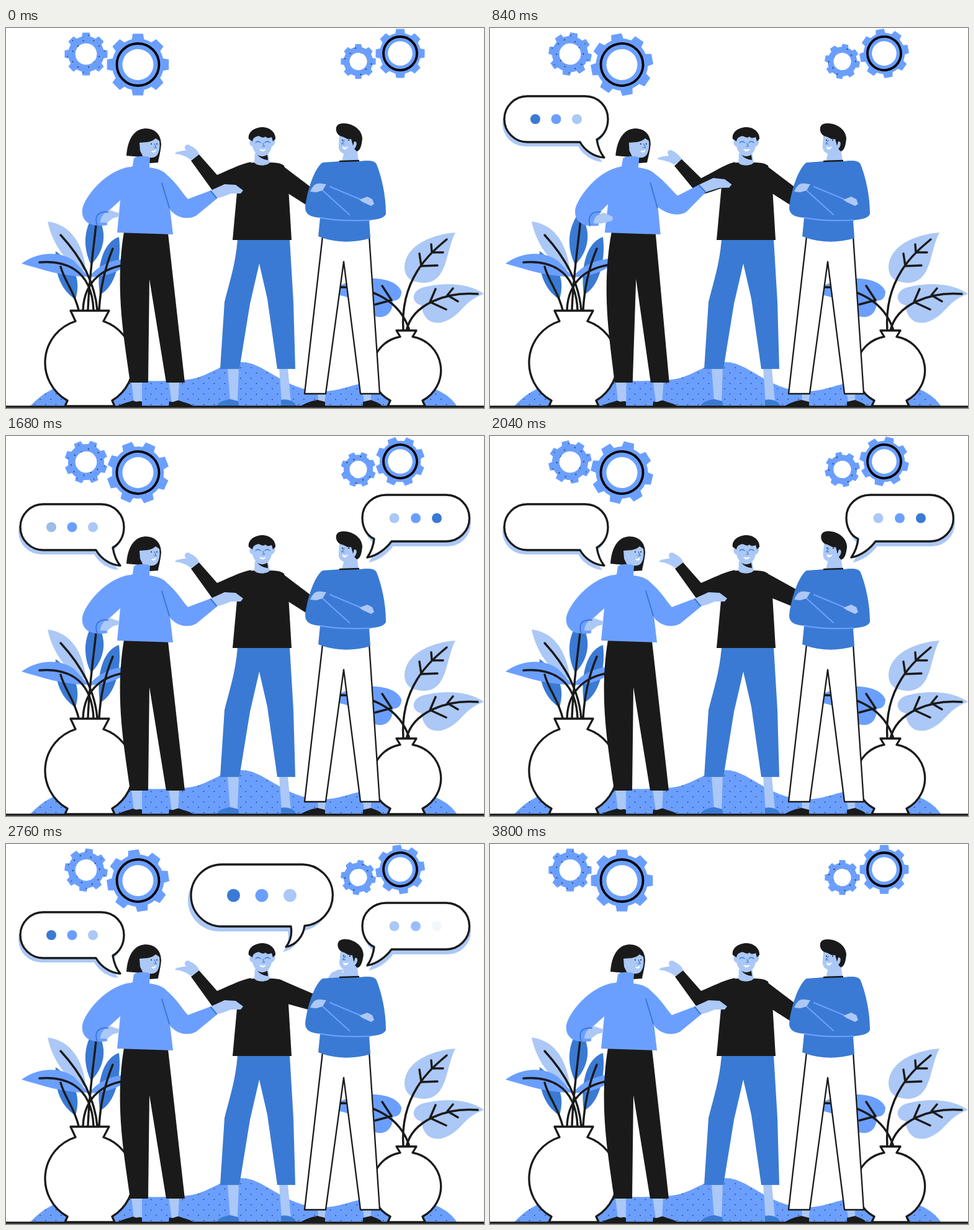
These frames come from a looping animation (770x613 px, 3840 ms). An HTML page:

```html
<!DOCTYPE html>
<html lang="en">
<head>
<meta charset="utf-8">
<title>Three people talking</title>
<style>
html, body { margin: 0; height: 100%; overflow: hidden; background: #fff; }
svg { display: block; width: 100vw; height: 100vh; }
.k { fill: #1a1a1a; }
.b { fill: #6b9fff; }
.d { fill: #3a7ad4; }
.l { fill: #abc8f6; }
.w { fill: #fff; }
.line { fill: none; stroke: #1a1a1a; stroke-width: 3.4; stroke-linecap: round; stroke-linejoin: round; }
.pot { fill: #fff; stroke: #1a1a1a; stroke-width: 3.3; stroke-linejoin: round; }
.fold { fill: none; stroke: #3a7ad4; stroke-width: 2; stroke-linecap: round; }
.thin { stroke-width: 1.2; }
.seam { stroke: #6b9fff; stroke-width: 2.2; }
</style>
</head>
<body>
<svg viewBox="0 0 770 613">
  <defs>
    <pattern id="dots" width="17" height="17" patternUnits="userSpaceOnUse">
      <circle class="k" cx="4" cy="4" r=".8"/><circle class="k" cx="12.5" cy="12.5" r=".8"/>
    </pattern>
    <path id="hill" d="M38 611C58 590 72 582 100 573C150 562 250 575 300 566C330 560 348 540 380 539C412 539 440 574 490 585C535 592 560 570 600 570C650 570 705 575 727 611Z"/>
  </defs>

  <g id="gears"></g>
  <use href="#hill" class="b"/><use href="#hill" fill="url(#dots)"/>

  <g id="leftPlant">
    <path class="d" d="M80 360C115 385 120 410 112 438C85 420 78 390 80 360ZM182 337C158 345 145 380 151 430C175 420 187 375 182 337ZM143 298C162 320 164 355 137 382C124 355 124 325 143 298Z"/>
    <path class="l" d="M67 312C95 316 122 335 129 392C100 385 75 350 67 312Z"/>
    <path class="b" d="M25 380C50 362 85 358 110 376L133 401C95 402 60 390 25 380ZM134 402C145 385 170 372 205 371C195 390 160 402 134 402Z"/>
    <path class="line" d="M88 334C112 360 142 400 147 455M146 308C142 350 134 400 132 455M54 378C90 375 138 385 141 455M200 381C160 385 126 405 124 455M172 356C160 385 152 420 150 455M88 385C95 410 110 425 117 455"/>
    <path class="pot" d="M104 456H166L157 473A71 71 0 0 1 171 601L175 610H95L99 601A70 70 0 0 1 112 473Z"/>
  </g>

  <g id="rightPlant">
    <path class="l" d="M724 330C695 332 645 346 642 385C642 402 652 411 675 411C712 409 708 360 724 330ZM770 429C745 410 700 410 670 419C650 427 655 445 669 447C672 470 685 478 702 475C735 465 735 440 770 429Z"/>
    <path class="b" d="M530 420C560 400 625 396 637 425C637 437 630 440 623 440C624 460 610 470 595 465C580 455 570 435 530 430Z"/>
    <path class="line" d="M710 341C690 358 634 400 640 488M685 349L686 362L704 362M666 364L669 384L695 383M760 429C710 425 655 445 645 488M692 421L683 442L709 454M720 420L711 431L728 441M538 418C590 418 635 440 650 488M606 416L621 439L595 446"/>
    <path class="pot" d="M629 488H661L655 498A55 55 0 0 1 671 601L675 610H615L619 601A55 55 0 0 1 635 498Z"/>
  </g>

  <g id="middleMan">
    <path class="l" d="M357 549H375L373 602H361ZM440 549H454L459 603H444Z"/>
    <path class="d" d="M339 611C342 602 355 599 363 599L374 602L376 611ZM443 611V600C450 598 465 600 468 611Z"/>
    <path class="d" d="M373 341C370 380 360 410 352 442L345 550H376L393 445L408 380L421 437L437 550H466L463 442L457 341Z"/>
    <path class="l" d="M401 202H422L425 217C418 223 406 223 400 218Z"/>
    <path class="k" d="M405 204L421 205L422 213C414 212 408 209 405 204Z"/>
    <path class="l" d="M396 174H430C435 180 434 190 428 191C426 201 420 207 413 207C405 207 399 200 397 191C391 190 391 181 396 180Z"/>
    <path class="k" d="M391 179C389 168 400 161 411 160C424 159 435 168 434 179L430 183L428 176C424 177 421 179 418 175C413 180 408 172 404 175C400 176 398 178 397 183Z"/>
    <path class="fold thin" d="M402 185Q406 181 410 185M417 185Q421 181 425 185M414 186L416 191H413"/>
    <path class="w" d="M408 195Q413 197 419 195Q417 199 413 199Q410 199 408 195Z"/>
    <path class="k" d="M400 217C404 223 420 223 425 217C435 217 443 218 448 222L455 258L460 342H365L373 255L370 230C380 220 388 217 400 217Z"/>
    <path class="l" data-pose="talk" d="M311 204L298 213C292 208 284 204 272 203C274 198 284 199 290 197C286 193 288 188 294 188C304 193 310 198 311 204Z" data-to="M304 228L295 236C288 233 276 234 265 229C268 224 280 226 285 223C280 219 282 214 288 215C296 219 300 224 304 228Z"/>
    <path class="k" data-pose="talk" d="M395 216C375 220 358 230 340 237L311 204L298 214L331 260C336 267 345 262 377 255Z" data-to="M395 216C380 222 365 238 340 253L304 227L295 240L335 276C343 283 350 277 377 262Z"/>
    <path class="k" data-pose="pat" d="M440 218L490 256L520 262L520 308L486 287L450 264Z" data-to="M440 218L498 243L520 250L520 276L490 268L450 257Z"/>
  </g>

  <g id="rightMan">
    <path class="l" d="M546 194L565 192L568 216H541Z"/>
    <g id="tilt">
      <path class="l" d="M537 172L558 173L563 182C569 183 567 191 563 193C562 200 556 204 545 203C538 201 535 196 536 188Z"/>
      <path class="k" d="M532 166C530 156 538 153 546 154C556 154 573 162 574 178C573 189 571 198 565 199L561 195C566 190 566 182 561 183L559 190L556 179C550 181 546 176 541 175C536 174 533 170 532 166Z"/>
      <path class="fold thin" d="M545 181L541 187H545"/>
      <circle class="k" cx="542" cy="181" r="1"/><circle class="k" cx="552" cy="181" r="1"/>
      <path class="w" d="M542 191Q546 194 551 191Q549 196 545 196Q542 195 542 191Z"/>
    </g>
    <path class="l" id="pat" d="M517 219L524 208L534 203L545 202L541 207L546 210L538 219Z"/>
    <path class="l" d="M502 589H515L514 603L503 602ZM575 589H588V602L577 604Z"/>
    <path class="k" d="M474 611C480 605 495 601 502 600L514 603V611ZM575 611V603L588 600C598 604 605 606 606 611Z"/>
    <path class="pot" style="stroke-width:2.3" d="M510 336L481 590H515L544 377L571 590H602L585 336Z"/>
    <path class="d" d="M539 215H568C580 214 593 212 597 220C605 240 612 270 612 300C610 306 600 309 585 310L587 339C560 347 530 347 503 336L506 306C490 305 482 300 482 290C484 265 497 225 510 217Z"/>
    <path class="line" style="stroke-width:2.5" d="M538 215L568 214"/>
    <path class="fold seam" d="M522 256L570 276M510 262L553 301M506 306C530 311 565 311 586 310"/>
    <path class="l" d="M490 264C495 252 500 250 508 251L516 252L510 262L500 265ZM569 277L582 272L590 276L593 284L588 287L575 281Z"/>
  </g>

  <g id="woman">
    <path class="l" d="M202 570H219V604H206ZM262 570H279L277 604H267Z"/>
    <path class="k" d="M178 611C185 606 193 605 205 601C211 605 216 600 219 603V611ZM262 611L263 602C269 606 275 599 279 601C288 605 300 606 302 611Z"/>
    <path class="k" d="M190 329L261 331L288 572H258L231 405L229 572H200C190 500 175 420 190 329Z"/>
    <path class="k" d="M224 162C242 162 250 174 250 188C249 200 246 210 245 217L232 218L216 208L194 206C195 195 198 164 224 162Z"/>
    <path class="l" d="M215 185L228 184C234 183 238 181 241 178L247 182C249 194 246 209 236 209L222 210L216 198Z"/>
    <path class="fold thin" d="M239 187L242 193H238"/>
    <circle class="k" cx="234" cy="187" r="1"/><circle class="k" cx="243" cy="187" r="1"/>
    <path class="w" d="M234 198Q238 199 242 196Q241 201 238 201Q235 201 234 198Z"/>
    <path class="b" d="M206 210C213 206 225 206 232 209L231 225C245 227 255 230 261 240L264 290L269 333L179 330L184 278L186 230L204 223Z"/>
    <g id="leftArm">
      <path class="b" data-pose="talk" d="M200 224C165 228 128 268 123 292C121 312 135 322 163 318L163 297L184 278L200 262Z" data-to="M200 224C172 228 145 268 138 292C137 312 150 322 172 320L178 297L184 286L200 262Z"/>
      <path class="l" data-pose="talk" d="M152 314C152 304 158 297 168 294L183 299L182 304L172 307L163 314Z" data-to="M170 318C170 308 177 304 188 306L200 316L201 324L195 326L186 318Z"/>
      <path class="fold" data-pose="talk" d="M147 319C142 305 147 295 164 297" data-to="M163 319C161 306 163 296 179 296"/>
    </g>
    <path class="l" data-pose="talk" d="M330 262L352 252L370 253L382 262L378 267L362 267L350 272L339 275Z" data-to="M328 234L352 222L372 226L382 233L378 238L362 240L350 241L342 245Z"/>
    <path class="b" data-pose="talk" d="M245 228C270 240 280 262 293 276L330 262L340 275L306 303C290 311 272 305 262 290L245 260Z" data-to="M245 228C268 238 282 250 300 259L328 234L342 244L318 283C310 294 280 288 257 277L245 260Z"/>
    <path class="fold" data-pose="talk" d="M330 263L339 274" data-to="M329 235L341 244"/>
    <path class="fold" d="M251 250L263 290"/>
  </g>

  <path class="line" d="M0 611H770"/>
  <g id="bubbles"></g>
</svg>

<script>
const FRAME = 40, LOOP = 3840, TURN = LOOP - FRAME;
const byId = id => document.getElementById(id);
const clamp = x => Math.min(1, Math.max(0, x));
const ramp = (t, a, b) => clamp((t - a) / (b - a));
const ease = x => x * x * (3 - 2 * x);
const pulse = (t, a, b, c, d) => ease(ramp(t, a, b)) * (1 - ease(ramp(t, c, d)));
const move = (id, transform) => byId(id).setAttribute('transform', transform);

function add(parent, tag, attrs) {
  const el = document.createElementNS('http://www.w3.org/2000/svg', tag);
  for (const name in attrs) el.setAttribute(name, attrs[name]);
  return parent.appendChild(el);
}

// Gears: centre, outer radius and black ring radius (none on the dotted ones)
function makeGear([x, y, r, ring]) {
  const g = add(byId('gears'), 'g', {});
  const points = [];
  for (let i = 0; i < 8; i++)
    for (const [deg, k] of [[-14, .82], [-9.5, 1], [9.5, 1], [14, .82]]) {
      const a = (i * 45 + deg) * Math.PI / 180;
      points.push([r * k * Math.cos(a), r * k * Math.sin(a)]);
    }
  const layer = fill => {
    add(g, 'polygon', { points: points.join(' '), fill });
    add(g, 'circle', { r: r * .83, fill });
  };
  layer('#6b9fff');
  if (!ring) layer('url(#dots)');
  add(g, 'circle', { r: r * .495, fill: '#fff' });
  if (ring) add(g, 'circle', { r: ring, fill: 'none', stroke: '#000', 'stroke-width': 3.8 });
  return t => g.setAttribute('transform', `translate(${x} ${y}) rotate(${(ring ? 360 : -360) * t / TURN})`);
}

function makeBubble({ d, shadow, start, period, swing, pivot, dots, y, r }) {
  const g = add(byId('bubbles'), 'g', {});
  const shade = add(g, 'path', { d, class: 'l', transform: `translate(${shadow})` });
  const body = add(g, 'path', { d, class: 'pot' });
  const marks = dots.map((cx, i) => add(g, 'circle', { cx, cy: y, r, class: 'dbl'[i] }));
  return t => {
    const p = t - start, phase = p % period;
    const out = 1 - ramp(t, 3320, 3760);
    shade.setAttribute('opacity', out * ramp(p, 0, 120));
    body.setAttribute('opacity', out * ramp(p, 20, 180));
    marks.forEach((dot, i) => {
      const shown = ramp(phase, [0, 60, 200][i], [140, 180, 400][i]);
      const hidden = ramp(phase, 1460 + i * 100, 1620 + i * 100);
      dot.setAttribute('opacity', out * shown * (1 - hidden));
    });
    g.setAttribute('transform', `rotate(${swing * (1 - ramp(p, 0, 500)) ** 2} ${pivot})`);
  };
}

// Shapes that blend between two poses with matching path commands
function makePose(el) {
  const from = el.getAttribute('d'), to = el.dataset.to.match(/[\d.]+/g);
  return pose => {
    let i = 0;
    const k = pose[el.dataset.pose];
    el.setAttribute('d', from.replace(/[\d.]+/g, n => +n + (to[i++] - n) * k));
  };
}

const gears = [[212.5, 59, 50.5, 34], [129, 42, 35, 0], [635, 41, 40, 27], [567.5, 54, 28.5, 0]].map(makeGear);
const poses = [...document.querySelectorAll('[data-to]')].map(makePose);
const bubbles = [
  { d: 'M60 110H153C175 110 190 127 190 147C190 162 183 174 172 180C174 192 178 202 184 209C168 208 153 198 145 184H60A37 37 0 0 1 60 110Z',
    shadow: '-3 7', start: 140, period: 1920, swing: 4.3, pivot: '184 225', dots: [73, 106.5, 140], y: 147, r: 8 },
  { d: 'M613 95H709A37.5 37.5 0 0 1 709 170H621C612 182 598 193 582 196C588 187 592 177 593 166C580 160 574 146 574 132C574 110 592 95 613 95Z',
    shadow: '2.5 8', start: 1150, period: 2030, swing: 4, pivot: '582 230', dots: [694, 660, 625.5], y: 132.5, r: 8 },
  { d: 'M348 33H478A49.6 49.6 0 0 1 481 132C479 148 468 163 451 166C458 157 461 145 459 133H348A50 50 0 0 1 348 33Z',
    shadow: '-5 8', start: 2260, period: 1920, swing: -3.6, pivot: '540 200', dots: [366.5, 412, 457.5], y: 83, r: 10.5 }
].map(makeBubble);

function draw(now) {
  const t = Math.floor(now % LOOP / FRAME) * FRAME;
  const pose = { talk: pulse(t, 0, 440, 520, 1040), pat: pulse(t, 1700, 2300, 2780, 3220) };
  const lean = pulse(t, 480, 1100, 1240, 1680), skew = .0333 * lean;
  gears.forEach(f => f(t));
  bubbles.forEach(f => f(t));
  poses.forEach(f => f(pose));
  move('woman', `matrix(1 0 ${-skew} 1 ${610 * skew} 0)`);
  move('leftArm', `translate(${4.5 * lean} 0)`);
  move('tilt', `rotate(${3 * pose.pat} 552 214)`);
  move('pat', `translate(0 ${45 * (1 - pose.pat)})`);
  requestAnimationFrame(() => draw(performance.now() - origin));
}
const origin = performance.now();
draw(0);
</script>
</body>
</html>
```
